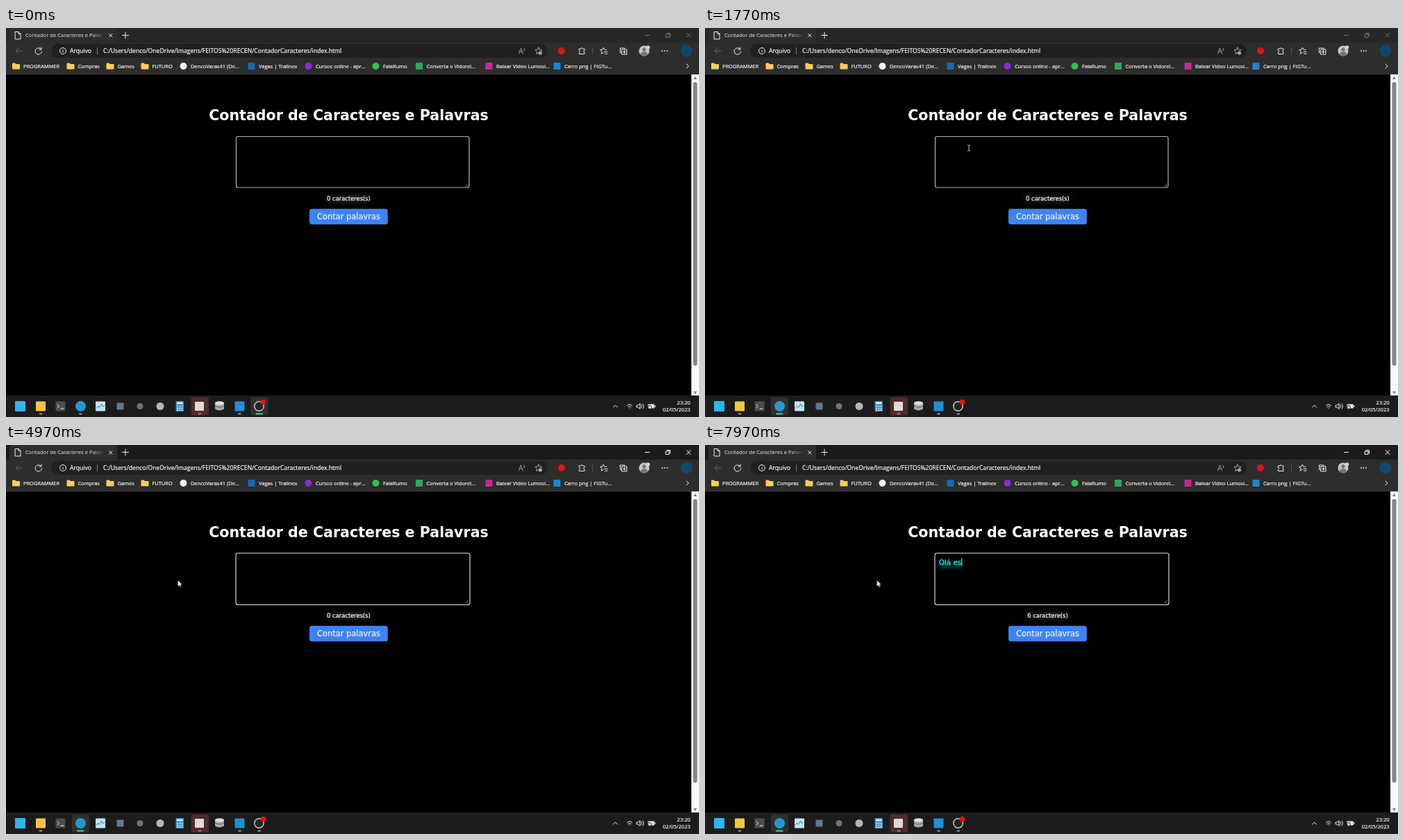
Recreate the animation shown at these times as an HTML page. Size 998 px wide and 561 px high, loop 8000 ms.

```html
<!DOCTYPE html>
<html lang="pt-BR">
<head>
<meta charset="utf-8">
<title>Contador de Caracteres e Palavras</title>
<style>
html, body { margin: 0; width: 100%; height: 100%; overflow: hidden; background: #000; }
svg { display: block; width: 100vw; height: 100vh; }
text { fill: #fff; stroke: #fff; stroke-width: .18; font: 7.5px "Open Sans", sans-serif; white-space: pre; }
.url { font-size: 8.6px; }
.tab { font-size: 7.6px; fill: url(#fade); stroke: none; }
.page text { font-family: "DejaVu Sans", sans-serif; }
.page .title { font-size: 20.6px; font-weight: bold; stroke: none; }
.page .count { font-size: 8.35px; filter: drop-shadow(0 0 4px #fff9); }
.page .label { font-size: 11.44px; stroke-width: .1; }
.page .typed { font-size: 10.4px; fill: #45e6e6; stroke: #45e6e6; filter: drop-shadow(1px 3px 3px #00e0e0); }
.mid { text-anchor: middle; }
.end { text-anchor: end; }
.line { fill: none; stroke: #f0f0f0; stroke-width: 1; stroke-linecap: round; stroke-linejoin: round; }
.dim { stroke: #666; }

.bar, .controls, .button, .idle, .focus, .before, .after, .arrow, .beam, .pointer {
  animation: 8s linear infinite;
}
.bar { animation-name: bar; }
.controls { animation-name: controls; }
.button { animation-name: hover; }
.idle, .before { animation-name: leave; }
.focus, .after { animation-name: arrive; }
.idle, .focus { animation-delay: 40ms; }
.focus { opacity: 0; }
.pointer { animation-name: travel; }
.arrow { animation-name: arrow; }
.beam { animation-name: beam; }

@keyframes bar { 0%, 22.4% { fill: #272727; } 23.5%, 100% { fill: #1b1b1b; } }
@keyframes controls { 0%, 22.4% { stroke: #707070; } 23.5%, 100% { stroke: #fff; } }
@keyframes hover {
  0%, 8.5% { fill: #3d84f2; filter: drop-shadow(0 0 5px #1f76ea00); }
  10.5%, 11.7% { fill: #1f76ea; filter: drop-shadow(0 0 5px #1f76eacc); }
  15%, 100% { fill: #3d84f2; filter: drop-shadow(0 0 5px #1f76ea00); }
}
@keyframes leave { 0%, 22.11% { opacity: 1; } 22.12%, 100% { opacity: 0; } }
@keyframes arrive { 0%, 22.11% { opacity: 0; } 22.12%, 100% { opacity: 1; } }
@keyframes travel {
  0%, 3% { transform: translate(1000px, 335px); }
  8.5% { transform: translate(560px, 286px); }
  10.5% { transform: translate(470px, 266px); }
  11.6%, 12% { transform: translate(412px, 249px); }
  17%, 30% { transform: translate(380px, 173px); }
  30.5%, 42% { transform: translate(380.6px, 173px); animation-timing-function: ease-in; }
  48.4% { transform: translate(292px, 195px); animation-timing-function: ease-out; }
  53%, 100% { transform: translate(247.5px, 195px); }
}
@keyframes arrow {
  0%, 13.3% { opacity: 1; } 13.31%, 46% { opacity: 0; } 46.01%, 100% { opacity: 1; }
}
@keyframes beam {
  0%, 13.3% { opacity: 0; } 13.31%, 46% { opacity: 1; } 46.01%, 100% { opacity: 0; }
}
</style>
</head>
<body>
<svg viewBox="0 0 998 561" preserveAspectRatio="none">
  <defs>
    <linearGradient id="fade">
      <stop offset=".84" stop-color="#f0f0f0"/>
      <stop offset="1" stop-color="#f0f0f0" stop-opacity="0"/>
    </linearGradient>
  </defs>

  <g class="browser">
    <rect class="bar" width="998" height="22"/>
    <path d="M5 22V4q0-4 4-4h147q4 0 4 4v18z" fill="#2d2d2c"/>
    <rect y="21" width="998" height="46" fill="#2d2d2c"/>
    <rect y="66" width="998" height="1" fill="#3c3c38"/>
    <path class="line" d="M13.5 5.500h4.500l3 3v7.500h-7.500zM18 5.500v3h3"/>
    <text class="tab" x="28" y="13">Contador de Caracteres e Palavr</text>
    <path class="line" d="M148.500 8.500l4.500 4.500m0-4.500l-4.500 4.500M167.500 10.500h9M172 6v9"/>
    <path class="line controls" d="M920.500 10.500h6M952 7.500h4.500v4.500M950.500 9h4.500v4.500h-4.500zM980 7.500l6 6m0-6l-6 6"/>

    <path class="line dim" d="M23 33h-9m4-4l-4 4 4 4"/>
    <path class="line" d="M50.300 30.300a4.700 4.700 0 1 0 1.200 3.500M51 28v3h-3"/>
    <rect x="65" y="23" width="715" height="20" rx="10" fill="#202020"/>
    <circle class="line" cx="82" cy="33" r="4.500"/>
    <path class="line" d="M82 32.500v2.500M82 30.700v.1"/>
    <text class="url" x="92" y="36.300">Arquivo</text>
    <path d="M131.500 28v10" stroke="#777"/>
    <text class="url" x="140" y="36.300">C:/Users/denco/OneDrive/Imagens/FEITOS%20RECEN/ContadorCaracteres/index.html</text>
    <path class="line" style="stroke:#999" d="M738.500 37l3-8 3 8m-5-3h4M746 29q2 2 0 4"/>
    <path class="line" style="stroke:#aaa" d="M767 28l1.500 3.200 3.500.4-2.500 2.400.6 3.500-3.100-1.700-3.100 1.700.6-3.500-2.500-2.400 3.500-.4z"/>
    <circle cx="769.500" cy="36" r="2.600" fill="#aaa"/>
    <circle cx="800" cy="33" r="5" fill="#e3121b"/>
    <path class="line" d="M825.500 30h2.500q1-3 2.500 0h2.500v2.500q-3 1 0 2.500v2.500h-7.500v-2.500q3-1.500 0-2.500z"/>
    <path d="M844.500 28v10" stroke="#555"/>
    <path class="line" d="M865 31.500l-3.100-.4-1.500-3-1.400 3-3.300.4 2.400 2.300-.6 3.300 2.500-1.400M862 34.500h4M862.500 37.200h3.500"/>
    <path class="line" d="M886 35.500h-1.500v-6.500h6.500v1.500M887 31h7v7h-7zM890.500 32.500v4M888.500 34.500h4"/>
    <circle cx="919" cy="33" r="7.500" fill="#c9c7cc"/>
    <path d="M913.500 38q1.500-4 5.500-4t5.500 4a7.500 7.500 0 0 1-11 0z" fill="#77757c"/>
    <circle cx="919" cy="31" r="2.700" fill="#77757c"/>
    <circle cx="924.500" cy="28" r="2.800" fill="#d9cfd8"/>
    <g fill="#eee"><circle cx="945" cy="33" r=".9"/><circle cx="948.500" cy="33" r=".9"/><circle cx="952" cy="33" r=".9"/></g>
    <circle cx="980" cy="33" r="8.500" fill="#12466f"/>
    <path class="line" d="M980 52l3 3-3 3"/>
    <g id="bookmarks"></g>
  </g>

  <g class="page">
    <rect y="67" width="998" height="463"/>
    <text class="title mid" x="493.500" y="133">Contador de Caracteres e Palavras</text>
    <rect class="idle" x="331.500" y="156.500" width="335.500" height="73.500" rx="2.500" fill="none" stroke="#b4b4b4" stroke-width="1.200"/>
    <rect class="focus" x="331" y="156" width="337" height="74.500" rx="3" fill="none" stroke="#e6eadc" stroke-width="1.100"/>
    <path d="M661.500 228.500l4-4m-1.500 4l1.500-1.500" stroke="#aaa" stroke-width=".8"/>
    <text class="typed" id="typed" x="336.700" y="172.500"></text>
    <path id="caret" d="M0 163v11.500" stroke="#b8f4f0" stroke-width=".9"/>
    <text class="count mid" id="count" x="493.500" y="249"></text>
    <rect class="button" x="437" y="260.700" width="112.800" height="22.600" rx="3.500"/>
    <text class="label mid" x="493.500" y="276.300">Contar palavras</text>
    <rect x="987" y="67" width="11" height="463" fill="#fafafa"/>
    <rect x="989.500" y="78" width="6" height="409" rx="3" fill="#858585"/>
    <path d="M990 74l2.500-4 2.500 4zM990 524l2.500 4 2.500-4z" fill="#808080"/>
  </g>

  <g class="taskbar">
    <rect y="530" width="998" height="31" fill="#1c1c1c"/>
    <rect x="266.500" y="532.500" width="25.500" height="26" rx="3" fill="#4b2d2d"/>
    <g class="before">
      <rect x="352.500" y="532.500" width="25" height="26" rx="3" fill="#303030"/>
      <rect x="359.500" y="555.500" width="10.500" height="2" rx="1" fill="#45d68d"/>
      <rect x="105" y="555.500" width="4.500" height="2" rx="1" fill="#9a9a9a"/>
    </g>
    <g class="after">
      <rect x="95" y="532.500" width="25" height="26" rx="3" fill="#303030"/>
      <rect x="102" y="555.500" width="10.500" height="2" rx="1" fill="#45d68d"/>
      <rect x="362.500" y="555.500" width="4.500" height="2" rx="1" fill="#9a9a9a"/>
    </g>
    <g id="apps"></g>
    <path class="line" d="M74 543l2.500 2.500-2.500 2.500M79 549h4"/>
    <path d="M129.500 549l3-4 2 2.500 3-5.500 2 4 2.500-2" fill="none" stroke="#2d7fb0"/>
    <rect x="244.500" y="538" width="11.500" height="15" rx="1" fill="#3f8fc4"/>
    <path d="M246 541h8.500" stroke="#e4f4ff" stroke-width="2.500"/>
    <path d="M246 545.500h8.500M246 548.500h8.500M246 551.200h8.500" stroke="#d5ebf8" stroke-width="1.600" stroke-dasharray="2 1.250"/>
    <path d="M301 541v8.500q6.500 4 13 0v-8.500z" fill="#aaa"/>
    <ellipse cx="307.500" cy="541" rx="6.500" ry="2.700" fill="#ddd"/>
    <path d="M301 545q6.500 4 13 0" fill="none" stroke="#666"/>
    <circle cx="370.500" cy="539.500" r="3.800" fill="#f00b12"/>
    <path class="line" d="M874.500 547l3-3 3 3M894.500 544.500q3.500-3.500 7 0M896 546.500q2-2 4 0M898 548.500v.1"/>
    <path class="line" d="M908.500 544h2l2.500-2.500v8l-2.500-2.500h-2zM915 543.500q1.500 2 0 4M917 542q3 3.500 0 7"/>
    <path d="M924.500 542.500h9v6h-9zM934 544h1.200v3H934z" fill="#eee"/>
    <circle cx="927" cy="547" r="2.500" fill="#eee" stroke="#1c1c1c"/>
    <text class="end" x="985.500" y="542.500">23:20</text>
    <text class="end" x="985.500" y="553">02/05/2023</text>
  </g>

  <g class="pointer">
    <path class="arrow" d="M0 0v9l2.100-1.900 1.500 3.200 1.500-.7-1.500-3.100h2.700z" fill="#fff" stroke="#111" stroke-width=".4"/>
    <path class="beam" d="M-2-4h1.500l.5.500.500-.5h1.500M0-3.500v7M-2 4h1.500l.5-.5.500.5h1.500" fill="none" stroke="#ddd" stroke-width=".9"/>
  </g>
</svg>
<script>
const LOOP = 8000, FOCUS = 1810, BLINK = 530;
const TEXT = "Olá es";
const KEY_TIMES = [5580, 5910, 6560, 6880, 7280, 7680];
const byId = id => document.getElementById(id);

const square = (x, y, size, fill) =>
  `<rect x="${x - size / 2}" y="${y - size / 2}" width="${size}" height="${size}" rx="1" fill="${fill}"/>`;
const circle = (x, y, size, fill) => `<circle cx="${x}" cy="${y}" r="${size / 2}" fill="${fill}"/>`;
const folder = (x, y, size, fill) =>
  `<path transform="translate(${x - 5.5} ${y - 4.5})" d="M0 1q0-1 1-1h3l1.500 1.500h4.500q1 0 1 1v5.500q0 1-1 1h-9q-1 0-1-1z" fill="${fill}"/>`;

const YELLOW = "#f4cf5c";
const bookmarks = [
  [folder, 14.5, YELLOW, "PROGRAMMER"],
  [folder, 93, YELLOW, "Compras"],
  [folder, 150, YELLOW, "Games"],
  [folder, 200, YELLOW, "FUTURO"],
  [circle, 255.5, "#f4f4f4", "DencoVaras41 (De..."],
  [square, 353.5, "#1769b5", "Vagas | Tralinex"],
  [circle, 435.5, "#8a2bd8", "Cursos online - apr..."],
  [circle, 532.5, "#2bc251", "FalaRumo"],
  [square, 595, "#28a960", "Converta o Vidorel..."],
  [square, 695.5, "#c42a92", "Baixar Video Lumosi..."],
  [square, 793.5, "#1d86cf", "Carro png | FIGTu..."],
];
byId("bookmarks").innerHTML = bookmarks.map(([shape, x, fill, label]) =>
  shape(x, 55, 10, fill) + `<text x="${x + 10.4}" y="57.800">${label}</text>`).join("");

const apps = [
  [square, 20.5, 15, "#2fb4ee"],
  [square, 50, 14, "#f5c542"],
  [square, 78.5, 14, "#4a4d50"],
  [circle, 107.5, 15, "#2599cf"],
  [square, 136, 14, "#c5e4f5"],
  [square, 164.5, 10, "#60788f"],
  [circle, 193, 9, "#77716a"],
  [circle, 222, 11, "#b5b5b8"],
  [square, 278.5, 13, "#e6d8d8"],
  [square, 336.5, 14, "#218fd6"],
  [circle, 364.5, 15, "#c8c8c8"],
];
const runningDots = [[50, "#9a9a9a"], [279, "#d87070"], [336.5, "#9a9a9a"]];
byId("apps").innerHTML =
  apps.map(([shape, x, size, fill]) => shape(x, 545.5, size, fill)).join("") +
  circle(364.5, 545.5, 12, "#252525") +
  runningDots.map(([x, fill]) =>
    `<rect x="${x - 2.3}" y="555.500" width="4.600" height="2" rx="1" fill="${fill}"/>`).join("");

const typed = byId("typed"), count = byId("count"), caret = byId("caret");
const start = performance.now();
let shown = -1;

function render() {
  const t = (performance.now() - start) % LOOP;
  const length = KEY_TIMES.filter(time => time <= t).length;
  if (length !== shown) {
    shown = length;
    typed.textContent = TEXT.slice(0, length);
    count.textContent = length ? `${length} caractere(s)` : "0 caracteres(s)";
    const width = length ? typed.getComputedTextLength() : 0;
    caret.setAttribute("transform", `translate(${337.2 + width} 0)`);
  }
  const lastInput = length ? KEY_TIMES[length - 1] : FOCUS;
  const lit = t >= FOCUS && Math.floor((t - lastInput) / BLINK) % 2 === 0;
  caret.style.opacity = lit ? 1 : 0;
  requestAnimationFrame(render);
}
render();
</script>
</body>
</html>
```
